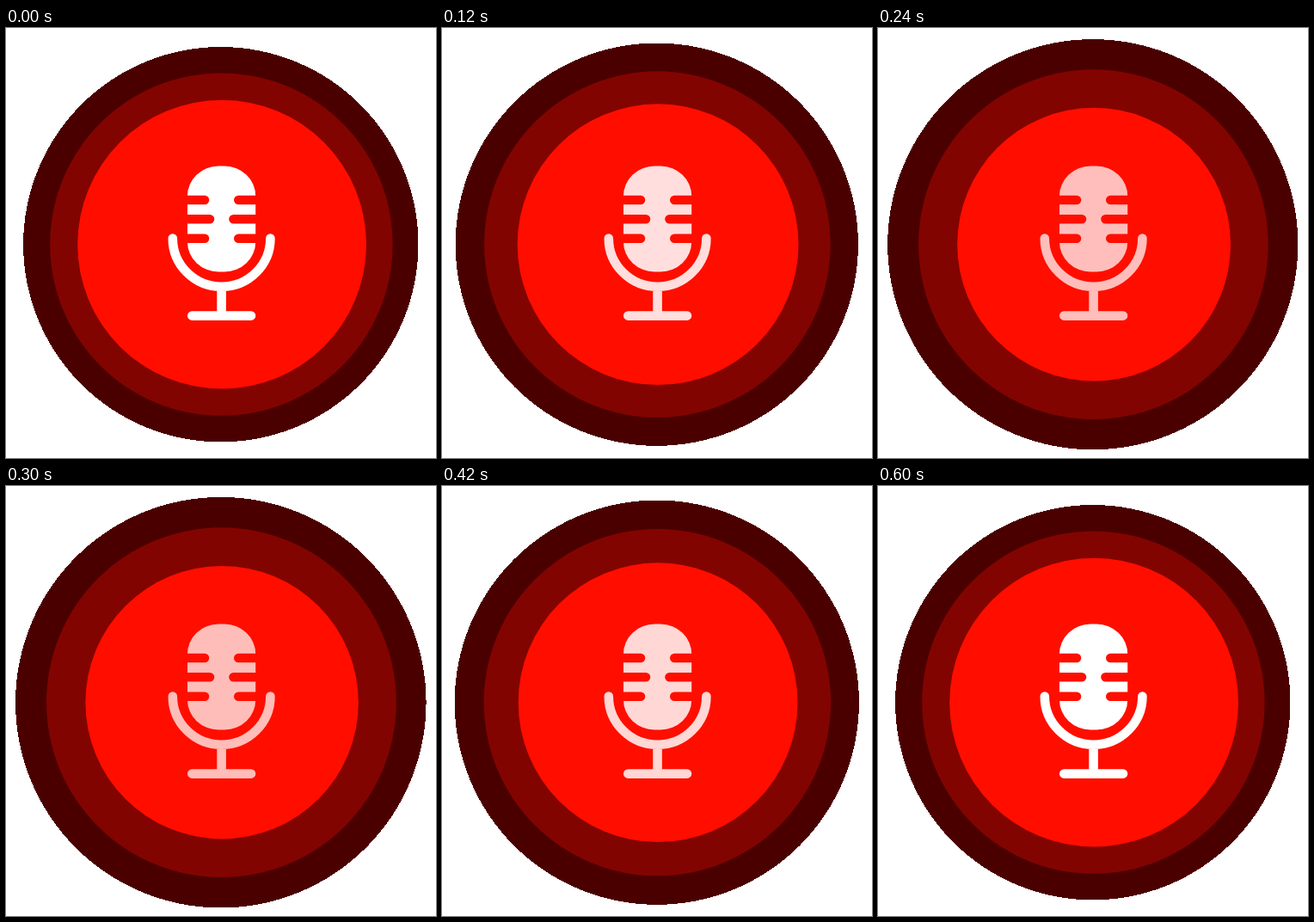
Write an HTML page that moves like this. It is 500x500 px and loops after 0.63 s.

```html
<!DOCTYPE html>
<html lang="en">
<head>
<meta charset="utf-8">
<title>Pulsing microphone</title>
<style>
  html, body { margin: 0; width: 100%; height: 100%; overflow: hidden; background: #fff; }
  svg { display: block; width: 100%; height: 100%; }
</style>
</head>
<body>
<svg viewBox="0 0 500 500">
  <circle id="outer" cx="249.8" cy="251.7" fill="#4b0000" shape-rendering="crispEdges"/>
  <circle id="middle" cx="250.4" cy="251.6" fill="#820400"/>
  <circle id="inner" cx="251.1" cy="251.7" fill="#ff0e00"/>
  <g id="mic" fill="none" stroke="#fff" stroke-width="10.6" stroke-linecap="round">
    <rect x="211" y="160.5" width="79.2" height="123" rx="36" ry="34.8" fill="#fff" stroke="none"/>
    <path d="M193.8 244.5A56.8 56.3 0 0 0 307.4 244.5M250.6 301V334M216.3 334.6H285"/>
  </g>
  <path fill="none" stroke="#ff0e00" stroke-width="10.6" stroke-linecap="round"
    d="M205 200H231M270.3 200H296M205 222.3H237M264.5 222.3H296M205 244.7H231M270.3 244.7H296"/>
</svg>
<script>
  const STEP = 30, STEPS = 21, PEAK = 9;
  const $ = id => document.getElementById(id);

  function draw(now) {
    const step = Math.floor(now / STEP) % STEPS;
    // Linear rise, then a slightly slower linear fall
    const pulse = step <= PEAK ? step / PEAK : (STEPS - 1 - step) / (STEPS - 1 - PEAK);
    $('outer').setAttribute('r', 229.7 + 10 * pulse);
    $('middle').setAttribute('r', 199.2 + 4.6 * pulse);
    $('inner').setAttribute('r', 167.9 - 10.1 * pulse);
    $('mic').setAttribute('opacity', 1 - 0.3 * pulse);
  }

  const start = performance.now();
  function tick() {
    draw(performance.now() - start);
    requestAnimationFrame(tick);
  }
  tick();
</script>
</body>
</html>
```
